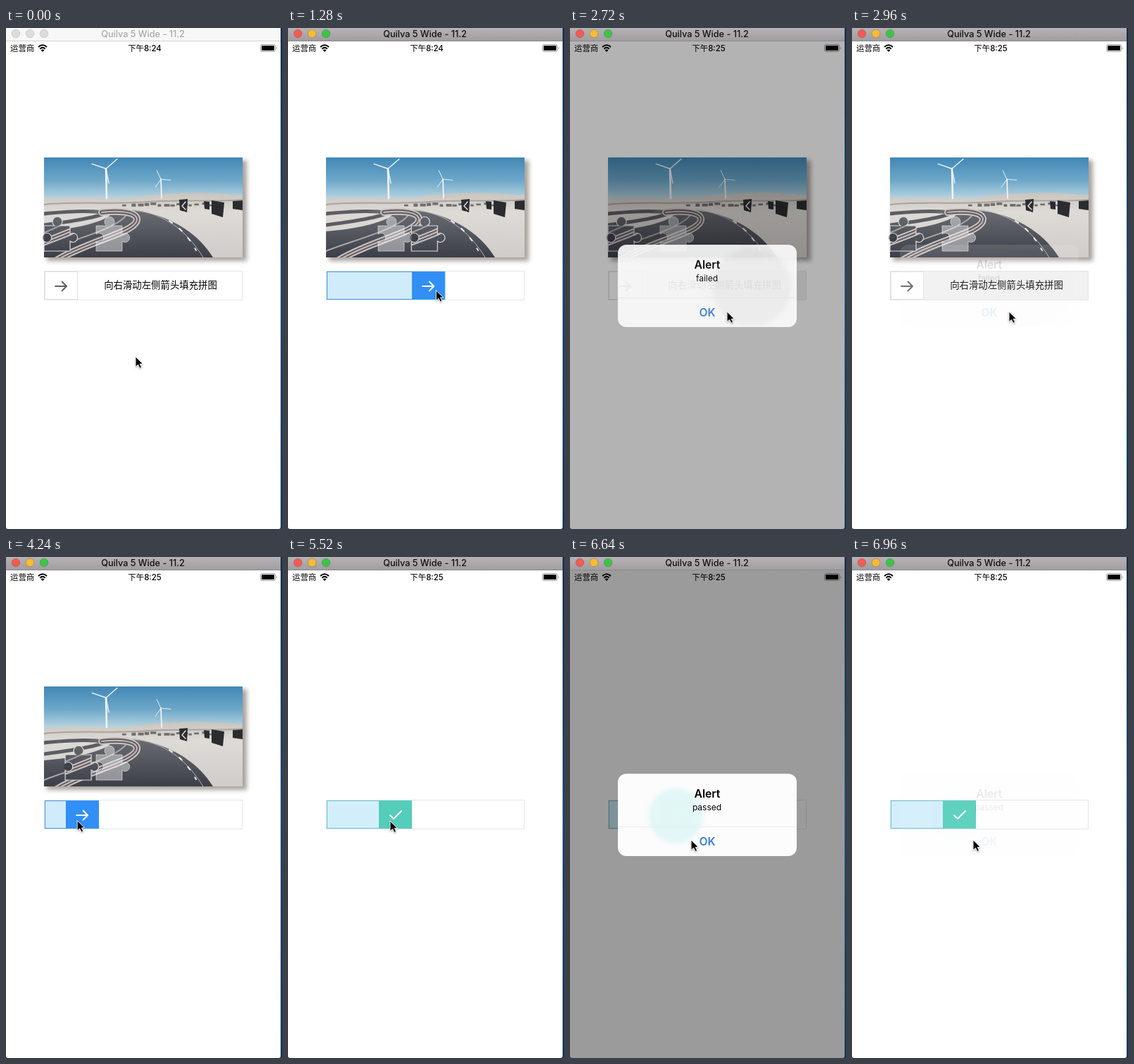
These frames come from a looping animation (392x712 px, 7040 ms). An HTML page:

```html
<!DOCTYPE html>
<html lang="zh">
<head>
<meta charset="utf-8">
<title>Slide captcha</title>
<style>
  html, body { margin: 0; width: 100%; height: 100%; overflow: hidden; background: #fff; }
  svg { display: block; }
  text { font-family: Inter, "Noto Sans CJK SC", "Noto Sans CJK", sans-serif; }
  .mid { text-anchor: middle; }
  .medium { font-weight: 500; }
  .bold { font-weight: 600; }
  .line { fill: none; stroke-linecap: round; stroke-linejoin: round; }
  #alert { transform-origin: 195px 366px; }
  #cursor { filter: drop-shadow(0 1px 1px #0005); }
</style>
</head>
<body>
<svg width="392" height="712" viewBox="0 0 392 712">
  <defs>
    <linearGradient id="sky" x2="0" y2="1">
      <stop offset="0" stop-color="#4287b6"/>
      <stop offset=".55" stop-color="#6ea8c9"/>
      <stop offset="1" stop-color="#bcd7e1"/>
    </linearGradient>
    <linearGradient id="land" x2="0" y2="1">
      <stop offset="0" stop-color="#c9c4be"/>
      <stop offset=".3" stop-color="#dedad6"/>
      <stop offset="1" stop-color="#d0ccc9"/>
    </linearGradient>
    <linearGradient id="road" x2="0" y2="1">
      <stop offset="0" stop-color="#6b6d73"/>
      <stop offset="1" stop-color="#3c3f48"/>
    </linearGradient>
    <linearGradient id="bar" x2="0" y2="1">
      <stop offset="0" stop-color="#b6b2b5"/>
      <stop offset="1" stop-color="#a19da0"/>
    </linearGradient>
    <linearGradient id="desk" x2="0" y2="1">
      <stop offset="0" stop-color="#14304f"/>
      <stop offset=".5" stop-color="#1f4f7c"/>
      <stop offset="1" stop-color="#123a63"/>
    </linearGradient>
    <filter id="soft" x="-30%" y="-30%" width="160%" height="160%"><feGaussianBlur stdDeviation="3.2"/></filter>
    <filter id="fuzz"><feGaussianBlur stdDeviation=".7"/></filter>
    <path id="jig" d="M128 281H143A7 7 0 1 1 151 281H165V293A6.5 6.5 0 1 1 165 303V317H128V303A6.5 6.5 0 1 0 128 293Z"/>
    <clipPath id="jigClip"><use href="#jig"/></clipPath>
    <clipPath id="frame"><rect x="54" y="184" width="282" height="142"/></clipPath>
    <clipPath id="cardClip"><use href="#card"/></clipPath>
    <rect id="card" x="68" y="308" width="254" height="117" rx="12"/>
    <path id="kerb" class="line" d="M72 330C120 301 188 290 186 271C184 261 160 259 136 262"/>

    <g id="scene" clip-path="url(#frame)">
      <rect x="54" y="184" width="282" height="60" fill="url(#sky)"/>
      <path d="M54 243C100 239 140 244 180 241C230 233 290 232 336 238V326H54Z" fill="url(#land)"/>
      <path d="M54 251C100 246 150 251 200 247S290 248 336 244" class="line" stroke="#a9a39d" stroke-width="2" filter="url(#fuzz)"/>
      <path d="M54 280C100 274 165 263 128 261C100 259 75 262 54 264" class="line" stroke="#5c5d63" stroke-width="5"/>
      <path d="M115 261C150 255 200 257 232 273C262 287 280 304 294 326H54V289C95 286 135 277 148 266Z" fill="url(#road)"/>
      <path d="M54 317C84 304 160 286 172 264" class="line" stroke="#aaa6a7" stroke-width="2"/>
      <use href="#kerb" stroke="#c9c4c1" stroke-width="10"/>
      <use href="#kerb" stroke="#625b61" stroke-width="6"/>
      <use href="#kerb" stroke="#c4bcba" stroke-width="2"/>
      <path d="M180 258C225 264 256 287 280 326" class="line" stroke="#b6b5b7"/>
      <path d="M232 274Q256 290 270 316" class="line" stroke="#eee" stroke-width="2" stroke-dasharray="5 13"/>
      <g id="shrubs" fill="#2b2c2f" filter="url(#fuzz)"/>
      <path d="M246 244l12-1-1 19-10-3z" fill="#2b2c2f"/>
      <path d="M253 261v11M255 247l-5 6 5 5" class="line" stroke="#ddd" stroke-width="1.5"/>
      <g id="turbines" class="line" stroke="#f1f5f6"/>
    </g>
  </defs>

  <rect width="392" height="712" fill="#fff"/>

  <g id="puzzle">
    <rect x="58" y="188" width="284" height="143" fill="#8b827c" opacity=".75" filter="url(#soft)"/>
    <use href="#scene"/>
    <use href="#jig" fill="#fff" fill-opacity=".42" stroke="#eee" stroke-opacity=".6"/>
    <g id="piece">
      <g clip-path="url(#jigClip)"><use href="#scene"/></g>
      <use href="#jig" fill="none" stroke="#d9d9d9" stroke-width="1.2"/>
      <circle cx="132" cy="298" r="6" fill="#33363d" opacity=".6"/>
    </g>
  </g>

  <rect id="track" x="54.5" y="345.5" width="281" height="41" stroke="#e4e5e7"/>
  <text id="hint" class="mid" x="219.5" y="370" font-size="13.4">向右滑动左侧箭头填充拼图</text>
  <rect id="fill" x="55.5" y="346.5" height="39"/>
  <g id="handle">
    <rect id="knob" x="55.5" y="346.5" width="46" height="39"/>
    <g id="icon" class="line" stroke-width="2">
      <path id="go" d="M70 367H86M79.5 360.5L86 367L79.5 373.5"/>
      <path id="check" d="M71 367l5 5 11-11"/>
      <path id="cross" d="M73 361l11 11M84 361l-11 11"/>
    </g>
  </g>

  <text x="6" y="33" font-size="11.4">运营商</text>
  <path d="M46 27Q52 21.5 58 27M48.3 29.7Q52 26 55.7 29.7" fill="none" stroke="#000" stroke-width="2"/>
  <path d="M52 34l-2.4-2.6Q52 29.8 54.4 31.4Z"/>
  <text id="clock" class="mid medium" x="197" y="33" font-size="11.4"></text>
  <rect x="361.5" y="23.5" width="21" height="10" rx="2.5" fill="none" stroke="#999"/>
  <rect x="363" y="25" width="18" height="7" rx="1"/>
  <path d="M384 26.5q1.5 2 0 4z" fill="#777"/>

  <rect id="dim" y="18" width="390" height="694"/>
  <g id="alert">
    <use href="#card" fill="#fdfdfd"/>
    <g clip-path="url(#cardClip)"><circle id="glow" cy="368" filter="url(#soft)"/></g>
    <path d="M68 383.5H322" stroke="#ededed"/>
    <text class="mid bold" x="195" y="342" font-size="15.7">Alert</text>
    <text id="note" class="mid" x="194.5" y="360" font-size="12"></text>
    <text class="mid bold" x="195" y="410" font-size="15.7" fill="#3a7fd9">OK</text>
  </g>

  <rect id="titlebar" width="390" height="18"/>
  <path id="rule" d="M0 18.5H390"/>
  <g id="lights" stroke-width=".8">
    <circle cx="14" cy="8" r="5.8"/><circle cx="34" cy="8" r="5.8"/><circle cx="54" cy="8" r="5.8"/>
  </g>
  <text id="title" class="mid medium" x="194.5" y="13" font-size="12.7">Quilva 5 Wide - 11.2</text>
  <rect x="390" width="2" height="712" fill="url(#desk)"/>
  <path d="M0 709q0 3 3 3H0zM390 709q0 3-3 3h3z" fill="#234"/>

  <path id="cursor" d="M0 0V14.5L3.5 11.5L6 16.5L8.6 15.3L6.3 10.5H10.5Z" stroke="#fff"/>
</svg>
<script>
const LOOP = 7040, STEP = 80;
const FAIL = 1600, RESET = 2720, PASS = 5200;
const MISS = { from: 880, to: 1490, travel: 167 };
const HIT = { from: 3680, to: 4960, travel: 74 };
const POPUPS = [
  { open: FAIL, close: 2640, note: 'failed', glow: { cx: 258, r: 56, fill: '#f3f3f3' } },
  { open: 5600, close: 6620, note: 'passed', glow: { cx: 150, r: 39, fill: '#e3f8f7' } }
];
const LOOKS = {
  idle: { knob: '#fff', edge: '#dfe2e5', fill: 'none', icon: '#5c6063', mark: 'go' },
  drag: { knob: '#318ff5', edge: '#4b98e0', fill: '#d0ebfa', icon: '#fff', mark: 'go' },
  fail: { knob: '#f57a7a', edge: '#c9a9a9', fill: '#f8eaea', icon: '#fff', mark: 'cross' },
  pass: { knob: '#55cdbb', edge: '#6fc5d0', fill: '#d2eefb', icon: '#fff', mark: 'check' }
};

const $ = id => document.getElementById(id);
const set = (id, attrs) => { for (const k in attrs) $(id).setAttribute(k, attrs[k]); };
const show = (id, on) => set(id, { visibility: on ? 'visible' : 'hidden' });

// Smooth rise from 0 to 1 between two times
function ramp(t, from, to) {
  const p = Math.min(1, Math.max(0, (t - from) / (to - from)));
  return p * p * (3 - 2 * p);
}

function add(parent, name, attrs) {
  const node = document.createElementNS('http://www.w3.org/2000/svg', name);
  for (const k in attrs) node.setAttribute(k, attrs[k]);
  $(parent).append(node);
}

function turbine(x, y, reach, turn) {
  add('turbines', 'path', { d: `M${x} ${y}L${x + 1} 242`, 'stroke-width': reach / 8 });
  for (let k = 0; k < 3; k++) {
    const a = (turn + 120 * k) * Math.PI / 180;
    const d = `M${x} ${y}l${reach * Math.cos(a)} ${reach * Math.sin(a)}`;
    add('turbines', 'path', { d, 'stroke-width': reach / 15 });
  }
}

function plantShrubs() {
  let seed = 7;
  const rand = () => (seed = seed * 16807 % 2147483647) / 2147483647;
  for (let i = 0; i < 14; i++) {
    add('shrubs', 'rect', { x: 165 + i * 9 + rand() * 6, y: 248 + rand() * 3, width: 4 + rand() * 6, height: 2 + rand() * 3, opacity: .6 });
  }
  add('shrubs', 'path', { d: 'M281 246l8 1v11l-7-1zM292 245l18 3-2 21-16-5zM322 246l14-1v14l-14-2z' });
}

function stateAt(t) {
  if (t >= PASS) return 'pass';
  if (t >= HIT.from) return 'drag';
  if (t >= RESET || t < MISS.from) return 'idle';
  return t >= FAIL ? 'fail' : 'drag';
}

function drawWindow(t) {
  const active = t >= MISS.from;
  const colors = ['#f65a52', '#f8bc32', '#3cc544'];
  set('titlebar', { fill: active ? 'url(#bar)' : '#f7f7f7' });
  set('rule', { stroke: active ? '#8d898c' : '#d3d3d3' });
  set('title', { fill: active ? '#111' : '#aaa' });
  set('lights', { stroke: active ? '#0003' : '#c6c6c6' });
  [...$('lights').children].forEach((c, i) => c.setAttribute('fill', active ? colors[i] : '#dcdcdc'));
  $('clock').textContent = t < FAIL + STEP ? '下午8:24' : '下午8:25';
}

function drawSlider(t) {
  const state = stateAt(t), look = LOOKS[state], idle = state === 'idle';
  const drag = t < RESET ? MISS : HIT;
  const x = drag.travel * ramp(t, drag.from, drag.to);
  const grey = t < RESET ? 255 : 241 + 14 * ramp(t, 3000, 3200);
  set('track', { fill: `rgb(${grey},${grey},${grey})` });
  set('fill', { width: x, fill: look.fill, stroke: idle ? 'none' : look.edge });
  set('handle', { transform: `translate(${x} 0)` });
  set('knob', { fill: look.knob, stroke: idle ? look.edge : look.knob });
  set('icon', { stroke: look.icon });
  for (const mark of ['go', 'check', 'cross']) show(mark, mark === look.mark);
  show('hint', idle);
  set('piece', { transform: `translate(${x - HIT.travel} 0)` });
  set('puzzle', { opacity: 1 - ramp(t, PASS, PASS + 240) });
}

function drawAlert(t) {
  const { open, close, note, glow } = POPUPS[t < HIT.to ? 0 : 1];
  set('dim', { opacity: .4 * ramp(t, open, open + 320) * (1 - ramp(t, close, close + 240)) });
  set('alert', { opacity: ramp(t, open, open + 240) * (1 - ramp(t, close, close + 410)) });
  $('alert').style.transform = `scale(${1 + .18 * Math.exp(-Math.max(0, t - open) / 130)})`;
  $('note').textContent = note;
  set('glow', glow);
}

function drawCursor(t) {
  let x = 184, y = 467;
  const go = (from, to, dx, dy) => {
    const p = ramp(t, from, to);
    x += dx * p;
    y += dy * p;
  };
  const pull = drag => go(drag.from, drag.to, drag.travel, 1);
  go(160, 720, -95, -95);
  pull(MISS);
  go(1680, 2000, -8, 51);
  go(2080, 2400, -25, -21);
  go(2960, 3520, -152, -29);
  pull(HIT);
  go(5680, 6240, 27, 27);
  set('cursor', { transform: `translate(${x} ${y})` });
}

turbine(142, 200, 21, -41);
turbine(220, 215, 14, 5);
plantShrubs();

const start = performance.now();
function tick() {
  const now = (performance.now() - start) % LOOP;
  const t = Math.floor(now / STEP) * STEP;
  for (const draw of [drawWindow, drawSlider, drawAlert, drawCursor]) draw(t);
  requestAnimationFrame(tick);
}
tick();
</script>
</body>
</html>
```
